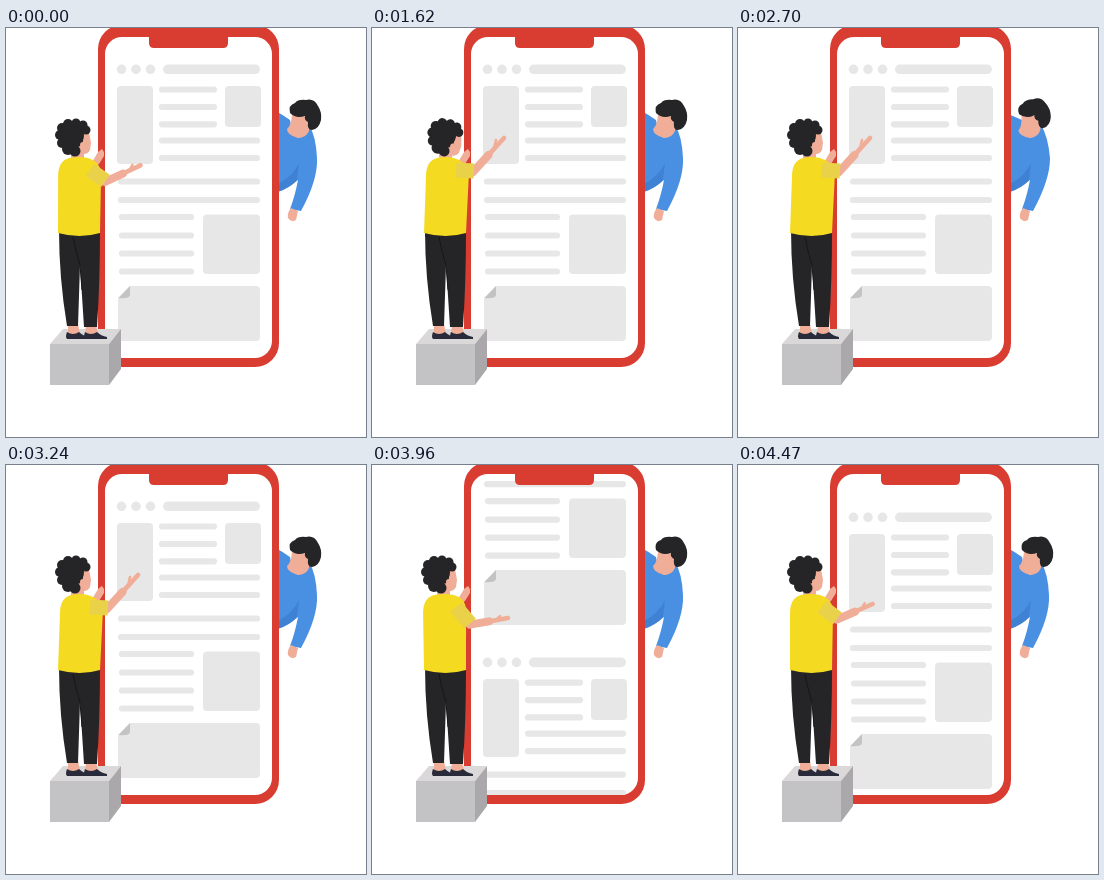
These frames come from a looping animation (360x409 px, 4500 ms). An HTML page:

```html
<!DOCTYPE html>
<html lang="en">
<head>
<meta charset="utf-8">
<title>Phone scrolling</title>
<style>
html, body { margin: 0; width: 100%; height: 100%; overflow: hidden; background: #fff; }
svg { display: block; width: 360px; height: 409px; }
.line { stroke: #e7e7e7; stroke-width: 6.2; stroke-linecap: round; }
.skin { fill: #f0ad98; }
.dark { fill: #252427; }
.arm { fill: none; stroke: #f0ad98; stroke-linecap: round; stroke-linejoin: round; }
</style>
</head>
<body>
<svg viewBox="0 0 360 409">
  <defs>
    <clipPath id="screen"><rect x="99" y="9" width="167" height="321" rx="17"/></clipPath>
    <g id="page" fill="#e7e7e7">
      <circle cx="115.5" cy="41.3" r="4.8"/><circle cx="130" cy="41.3" r="4.8"/><circle cx="144.5" cy="41.3" r="4.8"/>
      <rect x="157" y="36.5" width="97" height="9.6" rx="4.8"/>
      <rect x="111" y="58" width="36" height="78" rx="4"/>
      <rect x="219" y="58" width="36" height="41" rx="4"/>
      <rect x="197" y="186.5" width="57" height="59.5" rx="4"/>
      <path d="M124 258H250Q254 258 254 262V309Q254 313 250 313H116Q112 313 112 309V270Z"/>
      <path fill="#c3c2c4" d="M124 258V267Q123 271 112.500 270Z"/>
    </g>
  </defs>

  <g id="peeker">
    <path id="blueShirt" fill="#4a90e2"/>
    <path fill="#3f82d3" d="M293 135Q287 148 272 156V164Q284 160 291 152Z"/>
    <path class="skin" d="M285 180Q281 185 282 190Q285 195 290 192L292 183Z"/>
    <g id="peekHead">
      <path class="skin" d="M286 87L304 89L303 103Q300 110 292 110Q281 107 281 101Q285 98 286 87Z"/>
      <path class="dark" d="M284 85Q282 77 289 75Q292 71 300 72Q308 70 312 78Q316 84 315 92Q313 101 306 102Q301 102 302 94Q298 92 299 88Q290 91 284 85Z"/>
    </g>
  </g>

  <rect x="92" y="-3" width="181" height="342" rx="24" fill="#d93d31"/>
  <g clip-path="url(#screen)">
    <rect x="99" y="9" width="167" height="321" fill="#fff"/>
    <use id="oldPage" href="#page"/>
    <use id="newPage" href="#page"/>
  </g>
  <path fill="#d93d31" d="M143 0H222V15Q222 20 217 20H148Q143 20 143 15Z"/>

  <path fill="#dbd8d9" d="M44 316L57 301H115L103 316Z"/>
  <path fill="#c3c2c4" d="M44 316H103V357H44Z"/>
  <path fill="#aaa8aa" d="M103 316L115 301V341L103 357Z"/>

  <path class="skin" d="M62 296H72L74 306H62ZM80 296H90L92 307H79Z"/>
  <g id="shoes" fill="#2a2b3a">
    <path id="shoe" d="M61 304Q67 308 73 304Q77 308 83 309V311H61Q59 309 61 304Z"/>
    <use href="#shoe" x="18"/>
  </g>
  <path class="dark" d="M53 202H94Q94 255 91 299H78L74 237L72 298H61Q53 250 53 202Z"/>
  <path fill="none" stroke="#161518" d="M67 209Q70 225 74 237L76 262"/>

  <path class="skin" d="M85 136L92 124L96 121L98 124L98 128L93 136L87 140Z"/>
  <g id="head">
    <path class="skin" d="M72 104H83L85 115L84 122Q82 126 78 126V131Q72 136 65 130V116Z"/>
    <g id="hair" class="dark"></g>
    <circle class="skin" cx="77" cy="117" r="3"/>
  </g>
  <path id="shirt" fill="#f5da22"/>
  <path id="forearm" class="arm" stroke-width="8"/>
  <path id="hand" class="arm" stroke-width="4.6"/>
  <path id="thumb" class="arm" stroke-width="2.6"/>
  <path id="sleeve" fill="none" stroke="#e9d149" stroke-width="15" stroke-linejoin="round"/>
</svg>
<script>
const LOOP = 4500, PAGE = 309;
const $ = id => document.getElementById(id);
const set = (id, name, value) => $(id).setAttribute(name, value);
const clamp = x => Math.min(1, Math.max(0, x));
const mix = (a, b, k) => a.map((v, i) => v + (b[i] - v) * k);

// Smooth step from 0 to 1 between times a and b
function ramp(a, b, t) {
  const p = clamp((t - a) / (b - a));
  return p * p * (3 - 2 * p);
}

// Cubic Bezier easing with flat ends
function flick(p) {
  let lo = 0, hi = 1;
  for (let i = 0; i < 24; i++) {
    const u = (lo + hi) / 2, v = 1 - u;
    const x = 3 * u * v * v * 0.33 + 3 * u * u * v * 0.19 + u ** 3;
    if (x < p) lo = u; else hi = u;
  }
  return lo * lo * (3 - 2 * lo);
}

const lines = [
  [153, 211, [61.5, 79, 96.3]], [153, 254, [112.5, 130]],
  [112, 254, [153.5, 172]], [113, 188, [189, 207.5, 225.5, 243.5]]
];
$('page').insertAdjacentHTML('beforeend', lines.map(([x1, x2, ys]) =>
  ys.map(y => `<path class="line" d="M${x1 + 3} ${y}H${x2 - 3}"/>`).join('')).join(''));

const curls = [[65, 107, 13], [56, 100, 5], [62, 96, 5], [70, 95, 4.5], [77, 97, 4.5], [80, 102, 4.5],
  [54, 107, 5], [56, 115, 5], [62, 121, 6], [69, 123, 5.5], [71, 113, 6]];
$('hair').innerHTML = curls.map(([x, y, r]) => `<circle cx="${x}" cy="${y}" r="${r}"/>`).join('');

function draw(t) {
  const scroll = PAGE * flick(clamp((t - 3594) / 1155));
  set('oldPage', 'y', -scroll - Math.max(0, scroll - 152) * 0.1);
  set('newPage', 'y', PAGE - scroll);

  // The arm's return runs across the loop point
  const armTime = t < 900 ? t + LOOP : t;
  const down = ramp(3560, 4000, armTime) - ramp(4000, 5200, armTime);
  const elbow = mix([101, 144], [98, 160], down);
  const tip = mix([132, 110], [136, 154], down);
  const wrist = mix(elbow, tip, 0.68);
  const thumb = mix([124, 112], [128, 152], down);
  set('forearm', 'd', `M${elbow}L${mix(elbow, tip, 0.5)}`);
  set('hand', 'd', `M${mix(elbow, tip, 0.4)}L${wrist}L${tip}`);
  set('thumb', 'd', `M${wrist}L${thumb}`);
  set('sleeve', 'd', `M84 142L${mix([102, 143], [98, 159], down)}`);

  const lean = 3 * (1 - down);
  set('shirt', 'd', `M${51 + lean} 148Q${51 + lean} 133 ${62 + lean} 130Q73 128 82 130Q93 133 ${94 + lean} 144
    L94 205Q74 211 52 205Z`);

  const nod = ramp(800, 1500, t) - ramp(1800, 2600, t);
  set('head', 'transform', `translate(${nod * 1.5} 0) rotate(${nod * 11} 70 131)`);

  const look = ramp(1700, 2250, t) - ramp(2700, 3200, t);
  set('peekHead', 'transform', `rotate(${-8 * look} 292 106)`);
  set('blueShirt', 'd', `M268 ${82 + 3 * look}Q277 ${87 + 2 * look} 284 92Q286 105 292 110Q300 108 303 97
    Q310 108 ${311 + look} 130Q312 152 295 183L284 181Q289 168 292 152Q283 160 268 165Z`);
}

function frame() {
  draw(performance.now() % LOOP);
  requestAnimationFrame(frame);
}
frame();
</script>
</body>
</html>
```
